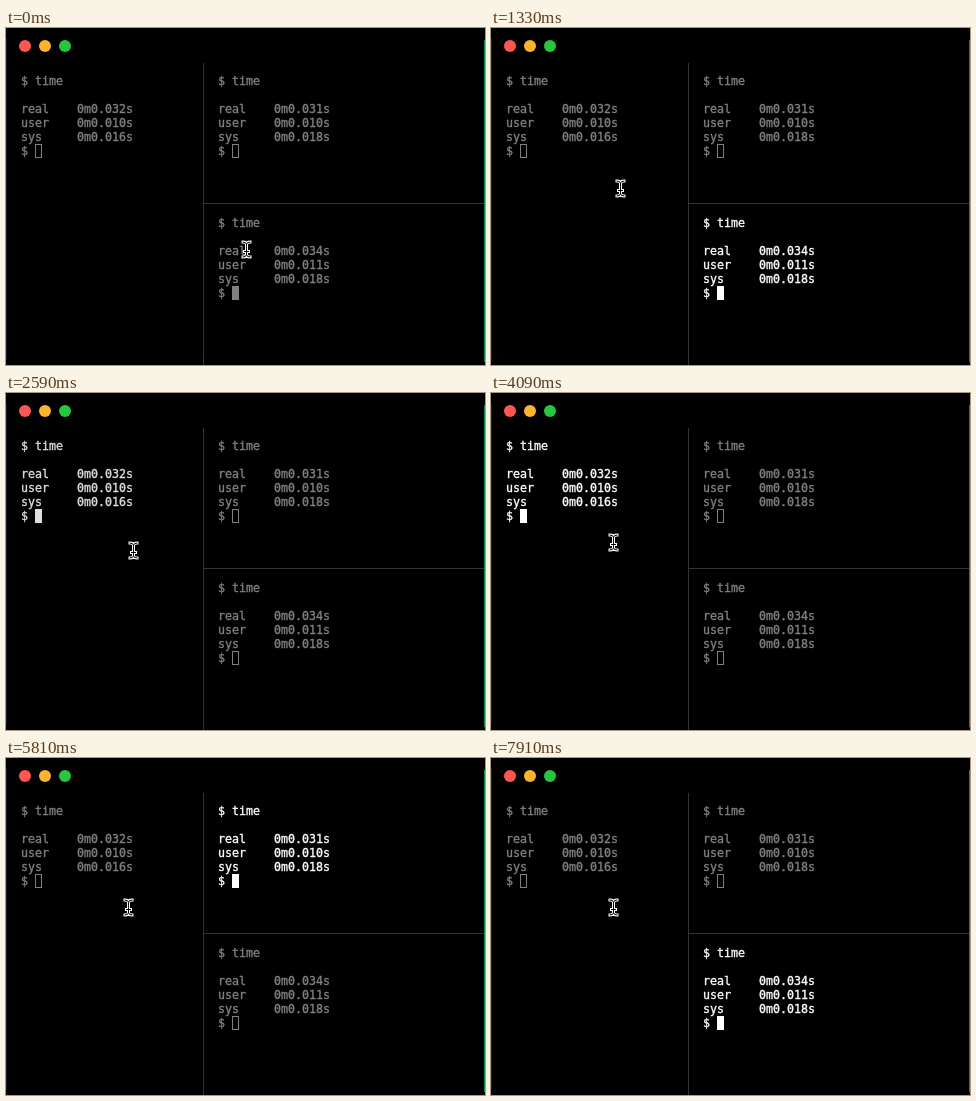
Animation of 479x337 px, one loop 8000 ms. Source, as an HTML page with a canvas:

```html
<!DOCTYPE html>
<html lang="en">
<head>
<meta charset="utf-8">
<title>Terminal panes</title>
<style>
  html, body { margin: 0; width: 100%; height: 100%; overflow: hidden; background: #000; }
  canvas { display: block; width: 479px; height: 337px; }
</style>
</head>
<body>
<canvas id="stage" width="479" height="337"></canvas>
<script>
const LOOP = 8000;
const ctx = document.getElementById('stage').getContext('2d');

const left = { x: 15, y: 57, real: '0m0.032s', user: '0m0.010s', sys: '0m0.016s' };
const top_ = { x: 212, y: 57, real: '0m0.031s', user: '0m0.010s', sys: '0m0.018s' };
const bottom = { x: 212, y: 199, real: '0m0.034s', user: '0m0.011s', sys: '0m0.018s' };
const panes = [left, top_, bottom];

// Tick at which each pane receives the focus
const focusChanges = [[0, bottom], [53, left], [106, top_], [147, bottom]];
const fadeIn = [0.5, 0.55, 0.7, 0.87, 1];
const DIM = 0.5;

// Pointer stops: tick, x, y
const pointerStops = [[0, 240, 221], [20, 129, 160], [50, 129, 160], [56, 127, 157], [74, 122, 149]];

function tickAt(ms) {
  const t = ms - 30;
  const cycle = Math.floor(t / 140);
  const step = Math.min(2, Math.floor((t - cycle * 140) / 20));
  return Math.max(ms < 20 ? 0 : 1, cycle * 3 + step);
}

function focusAt(tick) {
  let i = focusChanges.length - 1;
  while (focusChanges[i][0] > tick) i--;
  const [start, pane] = focusChanges[i];
  const next = focusChanges[i + 1];
  const leaving = next && tick === next[0] - 1;
  const level = leaving ? 0.75 : fadeIn[Math.min(tick - start, fadeIn.length - 1)];
  return { pane, level };
}

function pointerAt(tick) {
  const i = pointerStops.findIndex(stop => stop[0] > tick);
  if (i < 0) return pointerStops[pointerStops.length - 1].slice(1);
  const [t0, x0, y0] = pointerStops[i - 1];
  const [t1, x1, y1] = pointerStops[i];
  const p = (tick - t0) / (t1 - t0);
  const e = p * p * (3 - 2 * p);
  return [Math.round(x0 + (x1 - x0) * e), Math.round(y0 + (y1 - y0) * e)];
}

function rect(color, x, y, w, h) {
  ctx.fillStyle = color;
  ctx.fillRect(x, y, w, h);
}

function drawWindow() {
  rect('#000', 0, 0, 479, 337);
  rect('#161a2c', 0, 10, 1, 322);
  rect('#108a55', 478, 12, 1, 322);
  rect('#333', 197, 35, 1, 302);
  rect('#333', 198, 175, 280, 1);
  ['#fe5650', '#fdb32b', '#26c63f'].forEach((color, i) => {
    ctx.fillStyle = color;
    ctx.beginPath();
    ctx.arc(19 + 20 * i, 18, 6, 0, 2 * Math.PI);
    ctx.fill();
  });
}

function drawPane(pane, level, focused) {
  const { x, y } = pane;
  const shade = Math.round(255 * level);
  const color = `rgb(${shade},${shade},${shade})`;
  ctx.fillStyle = ctx.strokeStyle = color;
  ctx.font = '11.63px "DejaVu Sans Mono", monospace';
  ctx.lineWidth = 0.35;
  const write = (text, row) => {
    ctx.fillText(text, x, y + 14 * row);
    ctx.strokeText(text, x, y + 14 * row);
  };
  write('$ time', 0);
  ['real', 'user', 'sys'].forEach((name, i) => write(name.padEnd(8) + pane[name], i + 2));
  write('$', 5);

  ctx.lineWidth = 1;
  if (focused) ctx.fillRect(x + 14, y + 59, 7, 14);
  else ctx.strokeRect(x + 14.5, y + 59.5, 6, 13);
}

function drawPointer([x, y]) {
  const beam = new Path2D('M-3.5-7.5Q0-7.5 0-5Q0-7.5 3.5-7.5M0-5V5M-3.5 7.5Q0 7.5 0 5Q0 7.5 3.5 7.5M-2 2H2');
  ctx.save();
  ctx.translate(x + 0.5, y + 0.5);
  ctx.lineCap = 'square';
  for (const [color, width] of [['#fff', 3], ['#000', 1]]) {
    ctx.strokeStyle = color;
    ctx.lineWidth = width;
    ctx.stroke(beam);
  }
  ctx.restore();
}

function draw(now) {
  const tick = tickAt(now % LOOP);
  const focus = focusAt(tick);
  drawWindow();
  for (const pane of panes) {
    const focused = pane === focus.pane;
    drawPane(pane, focused ? focus.level : DIM, focused);
  }
  drawPointer(pointerAt(tick));
}

const start = performance.now();
function frame() {
  draw(performance.now() - start);
  requestAnimationFrame(frame);
}
frame();
</script>
</body>
</html>
```
